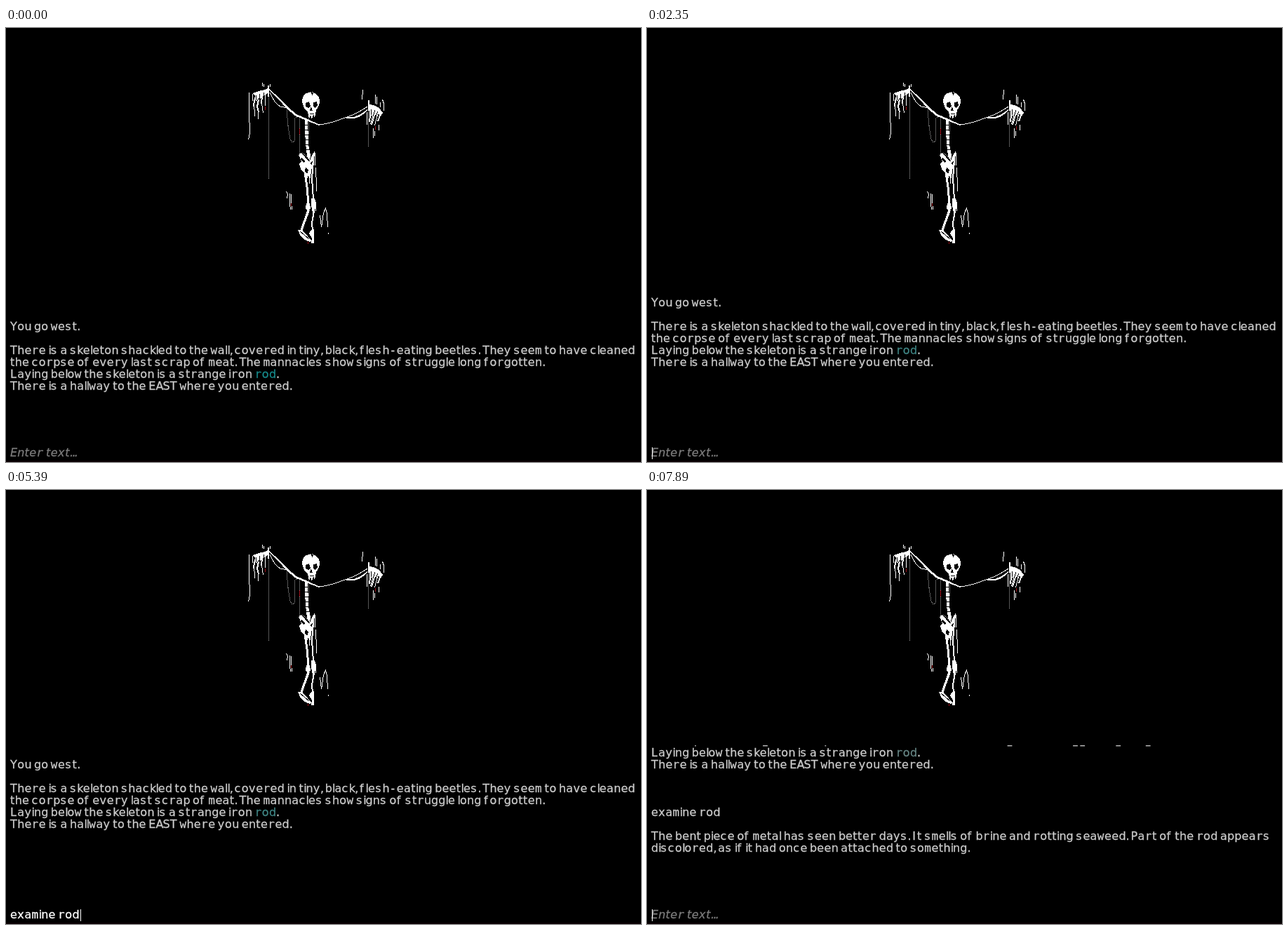
These frames come from a looping animation (905x619 px, 8 s). An HTML page:

```html
<!DOCTYPE html>
<html lang="en">
<head>
<meta charset="utf-8">
<title>Text adventure</title>
<style>
  html, body { margin: 0; width: 100%; height: 100%; overflow: hidden; background: #000; }
  svg { display: block; width: 905px; height: 619px; }
  text { font: 16px "DejaVu Sans", sans-serif; fill: #cbcbcb; stroke: #cbcbcb; stroke-width: .3; white-space: pre; }
  .mono { font-family: "DejaVu Sans Mono", monospace; }
  #hint { font-style: italic; fill: #7c7c7c; stroke: #7c7c7c; }
  #typed { fill: #fff; stroke: #fff; }
  #art { shape-rendering: crispEdges; fill: none; stroke: #fff; stroke-width: 1; }
  #art .bone { fill: #fff; stroke: none; }
  #art .hole { fill: #000; stroke: none; }
  #art .gap { stroke: #000; }
  #art .thick { stroke-width: 2; }
  #art .limb { stroke-width: 3; }
  #art .chain { stroke: #aaa; stroke-dasharray: 1 1; }
  #art .blood { stroke: #a3101a; }
</style>
</head>
<body>
<svg viewBox="0 0 905 619">
  <g id="art">
    <!-- chains -->
    <path class="chain" d="M374.5 98V216M516.5 118V169M400.5 115Q401 140 405 158Q408 167 411 160Q411 138 412 129L417 125M418.5 128V180M431.5 128V152M418 180Q424 176 429 184"/>

    <!-- left hand -->
    <path d="M346.5 92V132L347.5 138V150L345.5 159M365.5 78V83M367.5 80V84M376.5 80V84"/>
    <path class="thick" d="M374 82V98"/>
    <path class="bone" d="M351 93L360 90L369 88L373 86V93L369 96L365 98L362 102L360 100L357 105L355 102L353 105L355 97Z"/>
    <path class="thick" d="M354 102L353 112M360 102L358 112L360 120M365 97L364 108"/>
    <path d="M352.5 110L354.5 118V126M359.5 119V130M364.5 108L366.5 121M369.5 96V111M351.5 94V104"/>
    <path class="gap" d="M356 96L357 103M362 94L361 101M367 92V97"/>

    <!-- arms -->
    <path class="bone" d="M375 87L390 100L402 113L414 123L430 130L447 138L446 139L428 132L412 125L400 115L388 101L375 89Z"/>
    <path d="M376 92Q383 108 391 112L401 114M446 138Q464 136 480 129Q500 123 515 112"/>
    <path class="bone" d="M482 127L496 127Q507 123 515 116V118Q506 127 497 129H486Z"/>

    <!-- right hand -->
    <path class="thick" d="M517 103V118"/>
    <path class="bone" d="M518 109L524 110L532 114L537 121L534 126L531 122L529 127L526 124L523 128L521 124L518 127V119Z"/>
    <path class="thick" d="M519 124L518 134M525 124L521 138M534 122L530 133"/>
    <path d="M529.5 124L525.5 139M522.5 126L519.5 137"/>
    <path class="gap" d="M521 116L520 124M526 117L523 126M530 119L527 126"/>
    <path d="M508.5 88L507.5 102M526.5 95V108M528.5 98V109M536.5 102L538.5 108V118M533.5 106V113M514.5 120V138M523.5 143V157M525.5 147V154M531.5 138V146"/>

    <!-- skull -->
    <path class="bone" d="M422 105Q422 94 431 92L435 91Q447 94 447 105Q446 113 442 117L440 128L438 123L436 130L434 124L432 129L430 119L425 115Z"/>
    <path class="hole" d="M427 107L432 105L434 111L431 114L427 112ZM438 106L443 105L444 111L440 114L438 112ZM435 112L437 118H433ZM434 91L437 97L438 92ZM433 122H439V123H433Z"/>

    <!-- spine -->
    <path class="bone" d="M426 130H430L430 140L431 153L431 166L434 181L433 190L429 183L427 164L426 148Z"/>
    <path class="gap" d="M425 139L431 138M425 146L432 145M426 153L432 152M427 160L432 159M427 167L432 166M428 174L433 173"/>

    <!-- pelvis -->
    <path class="bone" d="M417 181L421 178L426 184L432 191L436 182L440 175L439 192L435 202L434 214L430 211L429 217L425 207L420 201L418 194L421 190Z"/>
    <path class="hole" d="M421 184L426 190L424 192L420 188ZM427 199L431 203L429 208L426 204ZM434 193L437 189L436 196Z"/>

    <!-- legs -->
    <path class="limb" d="M426 206L429 227L431 250"/>
    <path class="thick" d="M438 190L436 214L438 244M439 261L436 278L437 290"/>
    <path class="bone" d="M428 250L433 250L434 257L430 261L427 257ZM435 243L440 243L442 249L440 261L437 264L435 253Z"/>
    <path class="bone" d="M430 258L433 260L427 276L422 290H419L424 275Z"/>
    <path class="bone" d="M416 288L423 289L430 297L435 303L433 305L426 302L420 297ZM434 289L439 287V307H435L436 300L432 293Z"/>
    <path class="gap" d="M419 290L432 301M430 211L431 218"/>
    <path d="M441.5 199V212L442.5 214V233M440.5 178V196M432.5 213V222M441.5 249V261"/>

    <!-- scratches -->
    <path d="M399.5 233L401.5 237L400.5 243M404.5 236V251L405.5 259M406.5 237V248L407.5 259M447.5 267L449.5 284L452.5 264L455.5 257L457.5 265L458.5 284M459.5 292V294"/>
    <path class="blood" d="M369.5 112V117M418.5 143V152M526.5 140V145M406.5 250V254M430.5 305V308"/>
  </g>
  <g id="log"></g>
  <g id="tails" fill="#b4b4b4"></g>
  <text id="hint" y="610.5">Enter text...</text>
  <text id="typed" y="610.5"></text>
  <rect id="caret" y="598" width="1" height="17" fill="#fff"/>
  <rect y="617" width="905" height="2" fill="#0c0205"/>
</svg>
<script>
const LOOP = 8000, LEFT = 7, UNIT = 1.7, PITCH = 17, BEARING = 1;
const NARROW = { ' ': 2, i: 2, l: 2, '.': 2, ',': 2, t: 4, I: 4, f: 5, k: 5 };
const LINES = {
  0: 'You go west.',
  2: 'There is a skeleton shackled to the wall, covered in tiny, black, flesh-eating beetles. They seem to have cleaned',
  3: 'the corpse of every last scrap of meat. The mannacles show signs of struggle long forgotten.',
  4: 'Laying below the skeleton is a strange iron rod.',
  5: 'There is a hallway to the EAST where you entered.',
  9: 'examine rod',
  11: 'The bent piece of metal has seen better days. It smells of brine and rotting seaweed. Part of the rod appears',
  12: 'discolored, as if it had once been attached to something.'
};
const STAGES = [
  { until: 2350, top: 430.5, rod: '#16898a' },
  { until: 5590, top: 396.5, rod: '#3f8584' },
  { until: LOOP, top: 311.5, rod: '#668584' }
];
const COMMAND = LINES[9];
const KEYS = [2630, 2860, 3320, 3500, 3630, 3830, 3912, 3994, 4076, 4158, 4240];
// caret visibility flips: [time, visible]
const BLINKS = [[0, 0], [310, 1], [900, 0], [1510, 1], [2070, 0], [2350, 1], [4800, 0],
  [5390, 1], [6180, 0], [6740, 1], [7330, 0], [7890, 1]];

const $ = id => document.getElementById(id);
const advance = c => UNIT * (NARROW[c] || 6);
const widthOf = s => [...s].reduce((w, c) => w + advance(c), 0);

// Places each glyph on the pixel font's own grid
function setText(el, s) {
  el.setAttribute('x', [...s].map((c, i) => (LEFT - BEARING + widthOf(s.slice(0, i))).toFixed(1)).join(' '));
  el.innerHTML = s.replace('on rod', 'on <tspan id="rod">rod</tspan>')
    .replace(/[mwr-](?![^<]*>)/g, '<tspan class="mono">$&</tspan>');
}

function add(tag, parent, attrs = {}) {
  const el = document.createElementNS('http://www.w3.org/2000/svg', tag);
  for (const k in attrs) el.setAttribute(k, attrs[k]);
  return parent.appendChild(el);
}

const rows = Object.entries(LINES).map(([n, s]) => {
  const el = add('text', $('log'));
  setText(el, s);
  return { n: +n, el };
});
setText($('hint'), 'Enter text...');

// Descender tips of the line that is cut off at the top of the log
[...LINES[3]].forEach((c, i) => {
  if ('gyp'.includes(c)) add('rect', $('tails'), {
    x: LEFT + widthOf(LINES[3].slice(0, i)), y: 364, width: c === 'p' ? UNIT : 4 * UNIT, height: 1.5
  });
});

let shownStage = -1, shownTyped = null;

function draw(t) {
  const stage = STAGES.findIndex(s => t < s.until);
  if (stage !== shownStage) {
    shownStage = stage;
    const { top, rod } = STAGES[stage];
    for (const { n, el } of rows) {
      const y = top + n * PITCH;
      el.setAttribute('y', y);
      el.style.display = y > 370 && (n < 9 || stage === 2) ? '' : 'none';
    }
    $('rod').style.fill = $('rod').style.stroke = rod;
    $('tails').style.display = stage === 2 ? '' : 'none';
  }
  const typed = stage === 1 ? COMMAND.slice(0, KEYS.filter(k => k <= t).length) : '';
  if (typed !== shownTyped) {
    shownTyped = typed;
    setText($('typed'), typed);
    $('hint').style.display = typed ? 'none' : '';
    $('caret').setAttribute('x', Math.round(LEFT + widthOf(typed)));
  }
  const [, on] = BLINKS.filter(b => b[0] <= t).pop();
  $('caret').style.display = on ? '' : 'none';
}

const start = performance.now();
function tick() {
  draw((performance.now() - start) % LOOP);
  requestAnimationFrame(tick);
}
tick();
</script>
</body>
</html>
```
